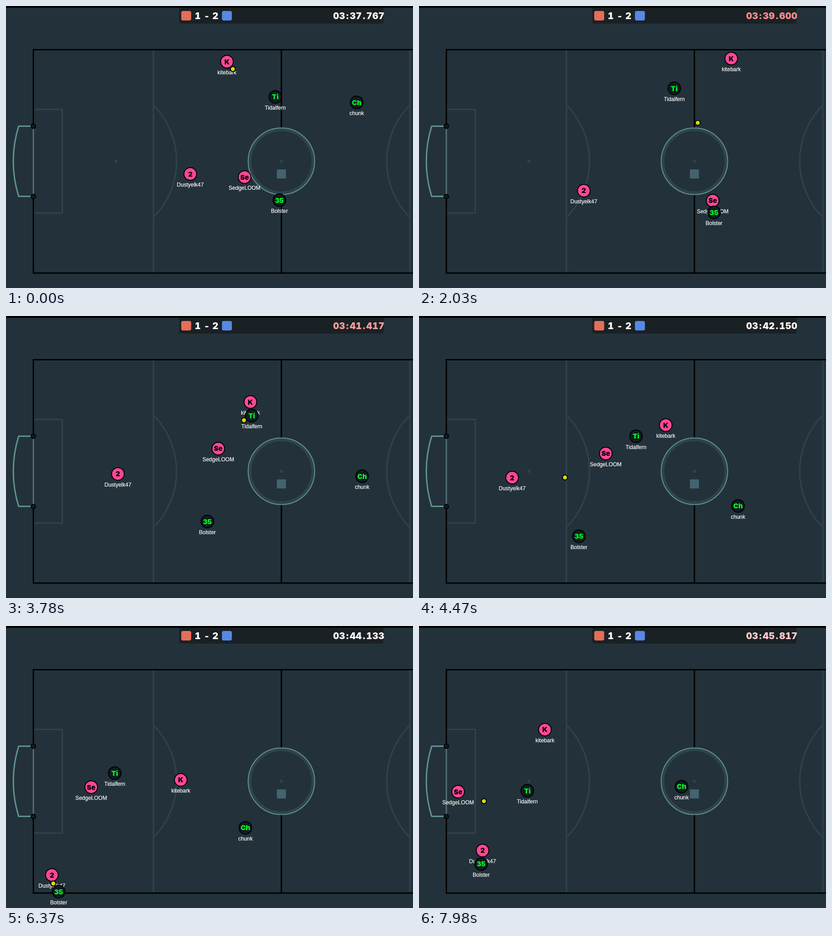
Recreate the animation shown at these times as an HTML page. Size 900 by 623 pixels, loop 8000 ms.

```html
<!DOCTYPE html>
<html lang="en">
<head>
<meta charset="utf-8">
<title>Football replay</title>
<style>
  html, body { margin: 0; width: 100%; height: 100%; overflow: hidden; background: #23323a; }
  svg { display: block; width: 100%; height: 100%; }
  text { text-anchor: middle; }
  .heavy, .badge { font: 900 20px Inter, sans-serif; font-variant-numeric: tabular-nums; fill: #fff; }
  .badge { font-size: 15px; fill: #000; }
  .name { font: 12px "Liberation Sans", Arial, sans-serif; fill: #fff; stroke: #fff; stroke-width: .2px; }
  .line { fill: none; stroke: #2f434d; stroke-width: 3; }
  .edge { fill: none; stroke: #000; stroke-width: 3; }
  .goal { fill: none; stroke: #629490; stroke-width: 3; stroke-linejoin: round; }
  .disc { stroke: #000; stroke-width: 2; fill: #fc4795; }
  .dark .disc { fill: #111c21; }
  .dark .badge { fill: #00ff24; }
</style>
</head>
<body>
<svg viewBox="0 0 900 623">
  <rect width="900" height="623" fill="#23323a"/>
  <rect width="900" height="4" fill="#000"/>

  <g class="line">
    <path d="M326 97V589M893 97V589M60 228.500H124.500V457.500H60"/>
    <path d="M326 219A176 176 0 0 1 326 467M893 219A176 176 0 0 0 893 467"/>
    <circle cx="609" cy="343" r="70" stroke-width="7"/>
  </g>
  <circle cx="243" cy="343" r="3.500" fill="#2f434d"/>
  <circle cx="609" cy="343" r="3.500" fill="#2f434d"/>
  <rect x="599" y="361" width="20" height="20" fill="#446270"/>
  <path class="edge" d="M910 96.500H60.500V590H910M609 97V269M609 417V589"/>
  <circle class="goal" cx="609" cy="343" r="73.500" style="stroke-width:2"/>
  <path d="M60.500 265V421" stroke="#536d7b" stroke-width="3"/>
  <path class="goal" d="M60 265.500H28A259 259 0 0 0 28 420.500H60"/>
  <g class="dark">
    <circle class="disc" cx="60.500" cy="265.500" r="5"/>
    <circle class="disc" cx="60.500" cy="421" r="5"/>
  </g>

  <g id="actors"></g>

  <path d="M383 4H835V34Q835 39 830 39H388Q383 39 383 34Z" fill="#1a2125"/>
  <rect x="387.500" y="11" width="22" height="21" rx="4" fill="#e56e56"/>
  <rect x="477.500" y="11" width="22" height="21" rx="4" fill="#5689e5"/>
  <text class="heavy" x="424 444 463" y="28.500">1-2</text>
  <g id="clock"></g>
</svg>
<script>
const LOOP = 8000;
const TIMES = [0, 1160, 2030, 3780, 5130, 6370, 7980];
const actors = document.getElementById('actors');
const clock = document.getElementById('clock');

function make(tag, attrs, parent, text = '') {
  const el = document.createElementNS('http://www.w3.org/2000/svg', tag);
  for (const key in attrs) el.setAttribute(key, attrs[key]);
  el.textContent = text;
  return parent.appendChild(el);
}

const clamp = v => Math.max(0, Math.min(1, v));

// A path is "x,y x,y ...", one point per shared time.
const parse = path => path.split(' ').map(p => p.split(',').map(Number));

function locate(t) {
  let i = 0;
  while (i < TIMES.length - 2 && t >= TIMES[i + 1]) i++;
  const span = TIMES[i + 1] - TIMES[i];
  return { i, span, u: (t - TIMES[i]) / span };
}

function slope(points, i, axis) {
  const a = Math.max(0, i - 1), b = Math.min(TIMES.length - 1, i + 1);
  return (points[b][axis] - points[a][axis]) / (TIMES[b] - TIMES[a]);
}

// Players steer along a smooth cubic curve.
function run(points, t) {
  const { i, span, u } = locate(t), v = 1 - u;
  return [0, 1].map(axis =>
    v * v * (1 + 2 * u) * points[i][axis] + u * u * (3 - 2 * u) * points[i + 1][axis] +
    span * u * v * (v * slope(points, i, axis) - u * slope(points, i + 1, axis)));
}

// The ball rolls straight and loses speed to friction.
function roll(points, t) {
  const { i, u } = locate(t), drag = 0.43;
  const k = (1 - drag ** u) / (1 - drag);
  return [0, 1].map(axis => points[i][axis] + (points[i + 1][axis] - points[i][axis]) * k);
}

function player(badge, name, team, path) {
  const g = make('g', { class: team }, actors), points = parse(path);
  make('circle', { class: 'disc', r: 14 }, g);
  make('text', { class: 'badge', y: 5.5 }, g, badge);
  make('text', { class: 'name', y: 28 }, g, name);
  return { g, at: t => run(points, t) };
}

function makeBall(path) {
  const points = parse(path), g = make('g', {}, actors);
  make('circle', { class: 'disc', r: 5.5, style: 'fill:#d6d80f' }, g);
  return { g, at: t => roll(points, t) };
}

const cast = [
  player('K', 'kitebark', 'pink', '488,123 606,145 690,116 540,190 545,290 386,340 278,229'),
  player('2', 'Dustyelk47', 'pink', '407,371 396,422 364,408 247,349 168,392 101,550 140,496'),
  player('Se', 'SedgeLOOM', 'pink', '527,378 590,426 649,430 469,293 354,332 188,356 86,366'),
  player('Ti', 'Tidalfern', 'dark', '595,201 566,188 564,182 543,220 398,309 240,325 239,364'),
  player('Ch', 'chunk', 'dark', '775,213 868,277 945,335 787,354 628,478 529,446 580,355'),
  player('35', 'Bolster', 'dark', '604,429 659,439 652,456 445,454 265,527 116,587 137,526'),
  makeBall('501,139 631,392 616,258 526,230 195,436 104,569 143,387')
];

// Digits sit in equal cells, separators in half-width ones.
const CELL = 13.33;
let right = 723.3;
const cells = [...'00:00.000'].map(c => {
  const width = c === '0' ? CELL : CELL * 0.75;
  right += width;
  return make('text', { class: 'heavy', x: right - width / 2, y: 28.5 }, clock, c);
});
const pad = (n, size) => String(n).padStart(size, '0');

function drawClock(t) {
  // 60 ticks per game second; playback starts slowly.
  const since = t - TIMES[1];
  const ticks = Math.floor(13121.4 + since * (since < 0 ? 0.0474 : 0.0628));
  const ms = Math.round(ticks * 1000 / 60), sec = Math.floor(ms / 1000);
  const text = `${pad(Math.floor(sec / 60), 2)}:${pad(sec % 60, 2)}.${pad(ms % 1000, 3)}`;
  cells.forEach((cell, i) => { cell.textContent = text[i]; });

  // Pulse between white and pink once per game second.
  const lag = 0.18 * clamp((TIMES[2] - t) / (TIMES[2] - TIMES[1]));
  const tint = (1 - Math.cos(2 * Math.PI * (ms / 1000 + lag - 0.05))) / 2;
  const level = Math.round(255 - 119 * tint);
  for (const cell of cells) cell.style.fill = `rgb(255,${level},${level})`;
}

function draw(t) {
  for (const { g, at } of cast) {
    const [x, y] = at(t);
    g.setAttribute('transform', `translate(${(x + 0.5).toFixed(2)} ${y.toFixed(2)})`);
  }
  drawClock(t);
}

const start = performance.now();
function loop(now) {
  draw(Math.max(0, now - start) % LOOP);
  requestAnimationFrame(loop);
}
draw(0);
requestAnimationFrame(loop);
</script>
</body>
</html>
```
